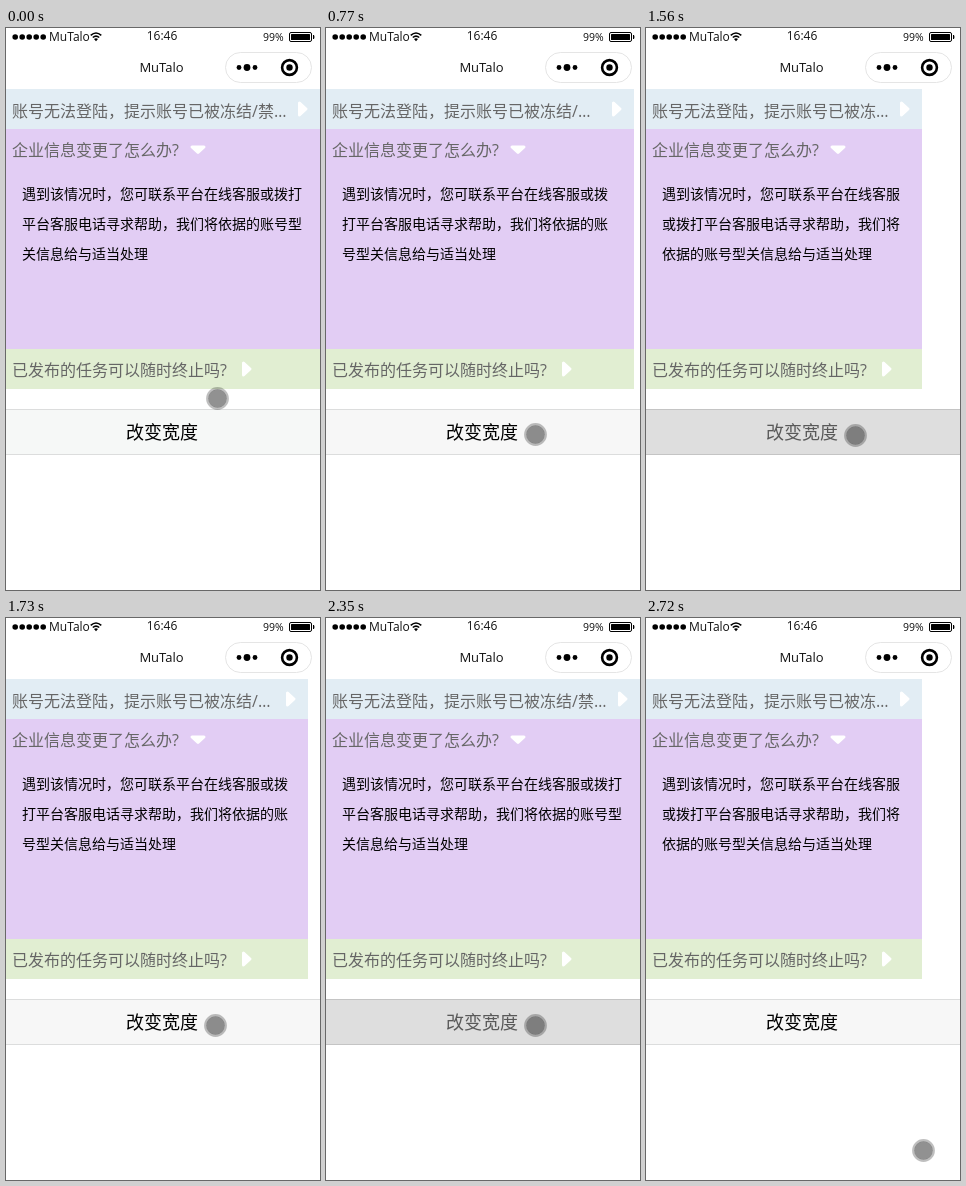
An HTML page that plays this animation: 314 by 562 pixels, repeating every 2800 ms.

```html
<!DOCTYPE html>
<html lang="zh-CN">
<head>
<meta charset="utf-8">
<title>改变宽度</title>
<style>
  html, body { margin: 0; width: 100%; height: 100%; overflow: hidden; background: #fff; }
  svg { display: block; width: 100vw; height: 100vh; }
  text { font-family: "Open Sans", "Noto Sans CJK SC", "Noto Sans CJK", sans-serif; white-space: pre; }
  .bar { fill: #111; }
  .head { font-size: 16px; fill: #666; }
  .body { font-size: 14px; fill: #000; font-family: "Noto Sans CJK SC", "Noto Sans CJK", sans-serif; }
  .arrow { fill: #fff; stroke: #fff; stroke-width: 3; stroke-linejoin: round; }
</style>
</head>
<body>
<svg viewBox="0 0 314 562">
  <rect width="314" height="562" fill="#fff"/>

  <g id="signal"></g>
  <text class="bar" x="43" y="12.5" font-size="12">MuTalo</text>
  <g fill="none" stroke="#000" stroke-width="1.6">
    <path d="M84.7 7.3Q90 2.7 95.3 7.3M86.8 9.5Q90 6.7 93.2 9.5"/>
    <path d="M88 11L90 13.2L92 11Q90 9.4 88 11Z" fill="#000" stroke="none"/>
  </g>
  <text class="bar" x="156" y="12.3" font-size="12" text-anchor="middle">16:46</text>
  <text class="bar" x="257" y="13" font-size="10.5">99%</text>
  <rect x="283.5" y="4.5" width="22" height="9" rx="1.5" fill="none" stroke="#000"/>
  <rect x="285" y="6" width="19" height="6" rx=".5"/>
  <path d="M307 7h1q1 2 0 4h-1z"/>

  <text class="bar" x="155.5" y="44.3" font-size="13" text-anchor="middle">MuTalo</text>
  <rect x="219.5" y="24.5" width="86" height="30" rx="15" fill="#fff" stroke="#e5e5e5"/>
  <circle cx="233" cy="39.5" r="2.4"/>
  <circle cx="241" cy="39.5" r="3.4"/>
  <circle cx="249" cy="39.5" r="2.4"/>
  <circle cx="283.5" cy="39.5" r="7.4" fill="none" stroke="#000" stroke-width="2.6"/>
  <circle cx="283.5" cy="39.5" r="3.2"/>

  <rect class="band" y="61" height="40" fill="#e2edf4"/>
  <rect class="band" y="101" height="220" fill="#e2cdf4"/>
  <rect class="band" y="321" height="40" fill="#e1eed2"/>
  <text id="first" class="head" x="6" y="88.5"></text>
  <text class="head" x="6" y="128">企业信息变更了怎么办?</text>
  <text class="head" x="6" y="348">已发布的任务可以随时终止吗?</text>
  <path id="firstArrow" class="arrow" d="M1.5 75v12l6.5-6z"/>
  <path class="arrow" d="M186 119h12l-6 5.5z"/>
  <path class="arrow" d="M237.5 335v12l6.5-6z"/>
  <text class="body" y="171"></text>
  <text class="body" y="201"></text>
  <text class="body" y="231"></text>

  <rect id="button" x="-2" y="381.5" width="318" height="45"/>
  <text id="label" x="156" y="411" font-size="18" text-anchor="middle">改变宽度</text>

  <g id="pointer">
    <circle r="10.2" fill="none" stroke="#000" stroke-opacity=".25" stroke-width="2.4"/>
    <circle r="9.2" fill="#000" fill-opacity=".43"/>
  </g>
</svg>
<script>
const LOOP = 2800;
const WIDE = 314, NARROW = 276;
const TITLE = "账号无法登陆，提示账号已被冻结/禁";
const ANSWER = "遇到该情况时，您可联系平台在线客服或拨打平台客服电话寻求帮助，我们将依据的账号型关信息给与适当处理";
// The screen refreshes only at these moments.
const TICKS = [0, 80, 160, 240, 310, 390, 470, 620, 690, 770, 860, 940, 1010,
  1560, 1650, 1730, 1800, 1880, 2350, 2430, 2490, 2570, 2640, 2720];
const PRESSES = [[620, 690], [1560, 1650], [2350, 2430]];

const $ = id => document.getElementById(id);
const bands = document.querySelectorAll(".band");
const lines = document.querySelectorAll(".body");

for (let i = 0; i < 5; i++) {
  const dot = document.createElementNS("http://www.w3.org/2000/svg", "circle");
  dot.setAttribute("cx", 9.2 + i * 7);
  dot.setAttribute("cy", 9);
  dot.setAttribute("r", 2.8);
  $("signal").append(dot);
}

const progress = (t, start, length) => Math.min(1, Math.max(0, (t - start) / length));
const mix = (a, b, p) => a + (b - a) * p;
const smooth = p => p * p * (3 - 2 * p);

// CSS "ease": cubic-bezier(.25, .1, .25, 1)
function ease(x) {
  const curve = (a, b, s) => 3 * a * s * (1 - s) ** 2 + 3 * b * s * s * (1 - s) + s ** 3;
  let low = 0, high = 1;
  for (let i = 0; i < 24; i++) {
    const mid = (low + high) / 2;
    if (curve(.25, .25, mid) < x) low = mid; else high = mid;
  }
  return curve(.1, 1, low);
}

function listWidth(t) {
  const moved = start => ease(progress(t, start, 300));
  const p = moved(728) - moved(1610) + moved(2388);
  return Math.round(mix(WIDE, NARROW, p));
}

function clipTitle(room) {
  let used = 14, end = 0;
  while (end < TITLE.length) {
    used += TITLE[end] === "/" ? 6 : 16;
    if (used > room) break;
    end++;
  }
  return TITLE.slice(0, end) + "…";
}

function pointerAt(t) {
  const down = smooth(progress(t, 20, 450));
  const nudge = progress(t, 1480, 80);
  const away = smooth(progress(t, 2490, 230));
  return [mix(mix(211.5, 209.5, down), 277.5, away),
          mix(mix(370.5, 406.5, down) + nudge, 532.5, away)];
}

function draw(time) {
  const t = TICKS.findLast(tick => tick <= time);
  const width = listWidth(t);
  const pressed = PRESSES.some(([from, to]) => t >= from && t < to);

  bands.forEach(band => band.setAttribute("width", width));
  $("first").textContent = clipTitle(width - 37);
  $("firstArrow").setAttribute("transform", `translate(${width - 22} 0)`);

  const perLine = Math.floor((width - 32) / 14);
  lines.forEach((line, i) => {
    line.setAttribute("x", 16);
    line.textContent = ANSWER.slice(i * perLine, (i + 1) * perLine);
  });

  $("button").setAttribute("fill", pressed ? "#dedede" : t < 620 ? "#f6f8f7" : "#f7f7f7");
  $("button").setAttribute("stroke", pressed ? "#c4c4c4" : "#dcdddd");
  $("label").setAttribute("fill", pressed ? "#595959" : "#000");
  $("pointer").setAttribute("transform", `translate(${pointerAt(t)})`);
}

const began = performance.now();
function loop() {
  draw((performance.now() - began) % LOOP);
  requestAnimationFrame(loop);
}
draw(0);
requestAnimationFrame(loop);
</script>
</body>
</html>
```
